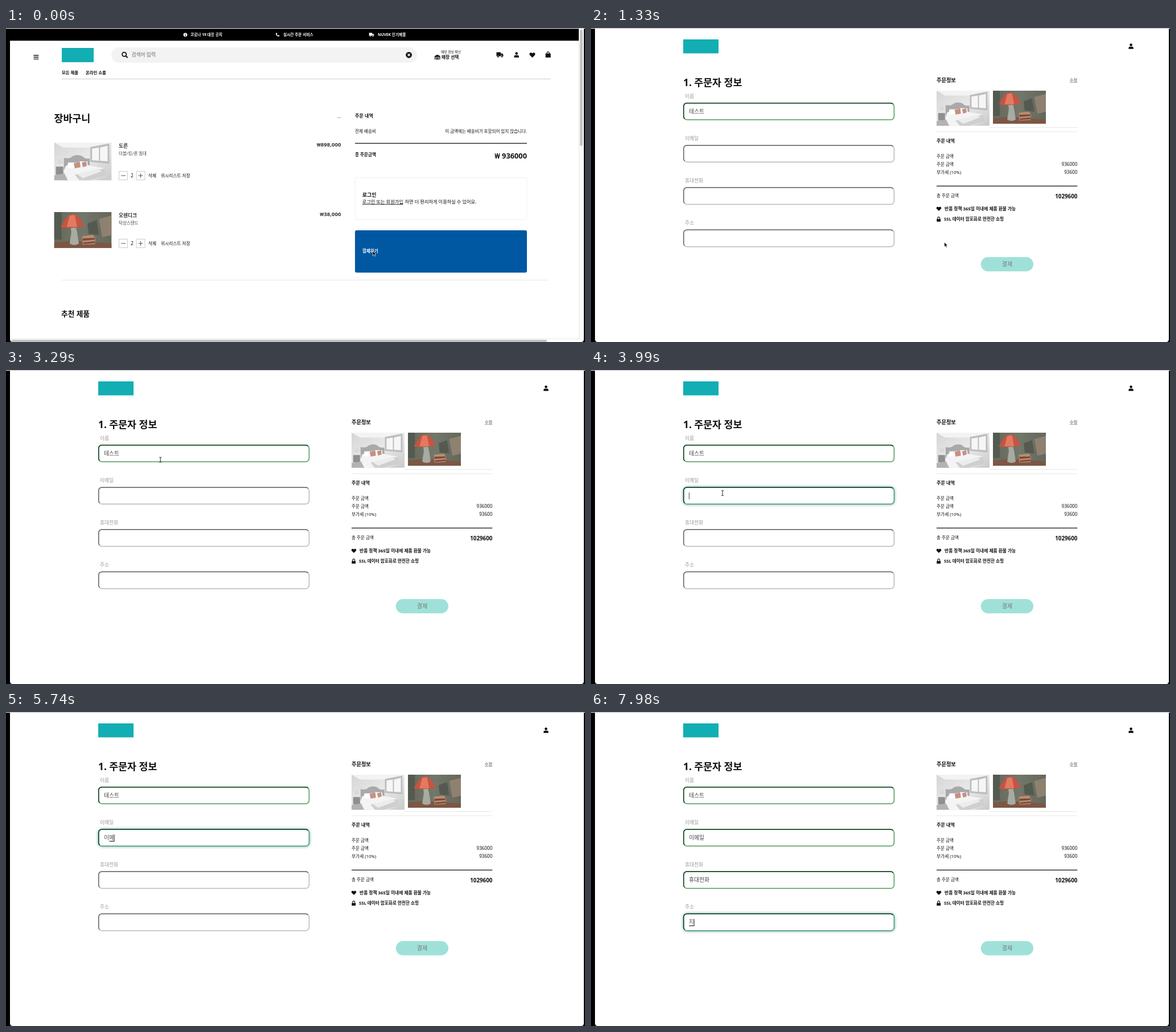
Animation of 1017x551 px, one loop 8000 ms. Source, as an HTML page:

```html
<!DOCTYPE html>
<html lang="ko">
<head>
<meta charset="utf-8">
<style>
html, body { margin: 0; width: 100%; height: 100%; overflow: hidden; background: #000 }
svg { display: block; font-family: "Noto Sans", "Noto Sans CJK KR", "Noto Sans CJK", sans-serif }
text { white-space: pre }
.b { font-weight: 700 }
.l { font-weight: 300 }
.e { text-anchor: end }
.m { text-anchor: middle }
.u { text-decoration: underline }
.glow { filter: drop-shadow(0 0 2.5px #5a9fbd) }
</style>
</head>
<body>
<svg id="stage" width="1017" height="551" viewBox="0 0 1017 551">
<defs>
<linearGradient id="wall" x2="1" y2="1"><stop stop-color="#d5d5d5"/><stop offset=".5" stop-color="#e9e9e9"/><stop offset="1" stop-color="#c9c9c9"/></linearGradient>
<linearGradient id="room" x2="1"><stop stop-color="#66685a"/><stop offset=".5" stop-color="#72776a"/><stop offset="1" stop-color="#65675b"/></linearGradient>
<symbol id="bed" viewBox="0 0 100 66" preserveAspectRatio="none">
<path fill="url(#wall)" d="M0 0H100V66H0Z"/>
<path fill="#f3f3f3" d="M0 0H100L62 9H16Z"/>
<path fill="#bdbdbd" d="M63 8L96 2V37L63 34Z"/>
<path fill="#f6f6f6" d="M66 11L78 9V32L66 31ZM80 9L93 6V33L80 32Z"/>
<path fill="#a9a9ab" d="M17 48V27Q28 29 32 24Q41 20 49 24Q53 29 62 28V47Z"/>
<path fill="#8f8f8f" d="M3 42H16V56H3Z"/>
<path fill="#d9d9d9" d="M7 29H13L15 37H5Z"/>
<path fill="#f4f4f4" d="M20 41Q40 29 61 40L88 45L92 58L66 66H22L17 50Z"/>
<path fill="#fff" d="M24 35H36V44H24ZM44 33H58V42H44Z"/>
<path fill="#c79181" d="M34 36L45 34L46 43L36 45ZM48 35L56 33L57 41L50 43Z"/>
<path fill="#cfcfcf" d="M36 56L88 45L92 58L62 66H44Z"/>
<path fill="#ececec" d="M40 55L76 46L83 50L50 62Z"/>
<path fill="#b3b3b3" d="M0 57L18 54L24 66H0Z"/>
</symbol>
<symbol id="lamp" viewBox="0 0 100 63" preserveAspectRatio="none">
<path fill="url(#room)" d="M0 0H100V63H0Z"/>
<path fill="#8f8170" d="M78 12L100 6V40L84 44Z"/>
<path fill="#545a50" d="M0 0H13V48H0ZM58 20L74 14L78 40L60 38Z"/>
<path fill="#7d5644" d="M0 54L30 50L100 55V63H0Z"/>
<path fill="#a7aba1" d="M29 27H38L40 35L43 55Q35 60 27 55L30 35Z"/>
<path fill="#c95340" d="M24 6Q32 2 41 6L53 24Q32 30 11 26Z"/>
<path fill="#e27a62" d="M27 6L36 5L40 26L22 26Z"/>
<path fill="#b78f73" d="M49 42L68 40L72 46L71 56L50 57Z"/>
<path fill="#814838" d="M50 46L71 45V48L50 50ZM51 53L71 51V54L51 56Z"/>
</symbol>
</defs>
<g id="cart"></g>
<g id="form"></g>
<g id="cursor"></g>
</svg>
<script>
const LOOP = 8000, STEP = 70, SWITCH = 280;
const $ = id => document.getElementById(id);

const icons = {
  user: 'M-2.5-2.6a2.5 2.5 0 1 1 5 0a2.5 2.5 0 1 1-5 0M-4.5 5V3.3Q-4.5 .8-2 .8H2Q4.5 .8 4.5 3.3V5Z',
  heart: 'M0 4.5L-4.5 0C-6.5-3-2.5-6 0-3C2.5-6 6.5-3 4.5 0Z',
  lock: 'M-3.8-.5H3.8V4.6H-3.8ZM-2.7-.5V-2.5a2.7 2.7 0 0 1 5.4 0V-.5H1.4V-2.5a1.4 1.4 0 0 0-2.8 0V-.5Z',
  truck: 'M-6-4.5H1.5V2.5H-6ZM2-2.5H4L6 0V2.5H2ZM-4.6 3a1.6 1.6 0 1 0 3.2 0a1.6 1.6 0 1 0-3.2 0M2 3a1.6 1.6 0 1 0 3.2 0a1.6 1.6 0 1 0-3.2 0',
  bag: 'M-4.5-2H4.5V5H-4.5ZM-2.6-2V-3a2.6 2.6 0 0 1 5.2 0V-2H1.4V-3a1.4 1.4 0 0 0-2.8 0V-2Z',
  store: 'M-4.8 4.2V-1.8L0-4.2L4.8-1.8V4.2H3.5V-.3H-3.5V4.2ZM-2.7 .6H2.7V1.8H-2.7ZM-2.7 2.6H2.7V4.2H-2.7Z',
  phone: 'M-3.6-3.4L-1.5-4L-.5-1.5L-1.6-.7Q-.8 .8 .7 1.6L1.5 .5L4 1.5L3.4 3.6Q-3.6 3.6-3.6-3.4Z'
};

// y is the vertical centre of the text
const text = (x, y, size, str, cls = '', fill = '#111') =>
  `<text x="${x}" y="${y + size * .37}" font-size="${size}" class="${cls}" fill="${fill}">${str}</text>`;
const rect = (x, y, w, h, fill, r = 0, more = '') =>
  `<rect x="${x}" y="${y}" width="${w}" height="${h}" rx="${r}" fill="${fill}" ${more}/>`;
const path = (d, stroke, width = 1, more = 'fill="none"') =>
  `<path d="${d}" stroke="${stroke}" stroke-width="${width}" ${more}/>`;
const icon = (name, x, y, fill = '#111', scale = 1) =>
  `<path d="${icons[name]}" fill="${fill}" transform="translate(${x} ${y}) scale(${scale})"/>`;
const photo = (id, x, y, w, h) => `<use href="#${id}" x="${x}" y="${y}" width="${w}" height="${h}"/>`;
const logo = (x, y, w, h) => rect(x, y, w, h, '#12aeb4');
const page = '<path fill="#fff" d="M7 0H1015V546Q1015 551 1010 551H12Q7 551 7 546Z"/>' + rect(0, 0, 1017, 1.3, '#c9c9c9');

const cartItem = (y, id, h, name, kind, price, row) =>
  photo(id, 84.5, y, 101, h) +
  text(198, y + 6, 8.7, name, 'b', '#333') +
  text(198, y + 19.3, 7.5, kind, '', '#444') +
  text(588.5, y + 3.8, 9.6, price, 'b e', '#333') +
  [198.5, 229].map(x => rect(x, row - 7.5, 15, 15, '#fff', 0, 'stroke="#ccc"')).join('') +
  path(`M202 ${row}h8M232.5 ${row}h8m-4-4v8`, '#555') +
  text(221.5, row, 8.4, '2', 'm') + text(250, row, 7.7, '삭제') + text(272, row, 7.7, '위시리스트 저장');

$('cart').innerHTML = page +
  rect(7, 1.3, 999, 21, '#000') +
  rect(1006, 1, 9, 545, '#fafafa') + path('M1006.5 1V546M7 545.5H1006', '#e8e8e8') +
  rect(1008.2, 3, 4.6, 204, '#c1c1c1', 2.3) + rect(9, 547, 941, 4, '#c1c1c1', 2) +
  '<circle cx="315" cy="11.8" r="3.4" fill="#fff"/>' + path('M315 11.3V14M315 9.4V10.4', '#000', 1.1) +
  icon('phone', 477, 11.8, '#fff', .85) + icon('truck', 642, 11.8, '#fff', .72) +
  text(324, 11.8, 6.7, '코로나 19 대응 공지', 'b', '#fff') +
  text(487, 11.8, 6.7, '실시간 주문 서비스', 'b', '#fff') +
  text(653, 11.8, 6.7, 'NUVEK 인기제품', 'b', '#fff') +
  path('M48.5 48H57.3M48.5 51.2H57.3M48.5 54.4H57.3', '#111', 1.4) +
  logo(98, 35, 56, 25) +
  rect(185, 34, 537, 27, '#f3f3f3', 13.5) +
  '<circle cx="207.7" cy="46.3" r="3.6" fill="none" stroke="#111" stroke-width="1.8"/>' +
  path('M210.2 48.8L213.6 52.2', '#111', 2) +
  text(220.5, 47, 8.7, '검색어 입력', '', '#666') +
  '<circle cx="707.6" cy="47.3" r="5.4" fill="#111"/>' + path('M705.6 45.3l4 4m0-4l-4 4', '#fff', 1.5) +
  text(764, 42.3, 5.8, '매장 정보 확인') + icon('store', 757.7, 51) + text(765, 51.3, 7.7, '매장 선택', 'b') +
  icon('truck', 867.5, 47) + icon('user', 896.7, 47, '#111', .95) + icon('heart', 924.5, 47.5) + icon('bag', 952.2, 46.8) +
  text(98, 78.5, 7.4, '모든 제품', 'b') + text(140, 78.5, 7.4, '온라인 쇼룸', 'b') +
  path('M98 89.4H956.5', '#ccc') +
  text(84.5, 158.5, 17.3, '장바구니', 'b') + text(588.5, 155, 8.5, '...', 'e', '#333') +
  cartItem(200.7, 'bed', 66.8, '도른', '더블/킹/퀸 침대', '₩898,000', 259) +
  cartItem(323, 'lamp', 63.3, '오렌디크', '탁상스탠드', '₩38,000', 378) +
  text(613, 154.5, 8.1, '주문 내역', 'b') + text(613, 181.3, 7.6, '전체 배송비') +
  text(915, 181.3, 7.56, '이 금액에는 배송비가 포함되어 있지 않습니다.', 'e') +
  path('M613 202.4H915', '#111', 1.4) +
  text(613, 222.3, 7.6, '총 주문금액', 'b') + text(915, 223.8, 12.8, '₩ 936000', 'b e') +
  rect(613, 262.5, 302, 74, '#fff', 3, 'stroke="#f0f0f0"') +
  text(625.7, 292.8, 9, '로그인', 'b') + text(625.7, 305, 8.2, '로그인 또는 회원가입', 'u') +
  text(700.5, 305, 8.2, '하면 더 편리하게 이용하실 수 있어요.') +
  rect(613, 355, 302, 74.3, '#0058a3', 3) + text(625.7, 391.3, 7.6, '결제하기', 'b', '#fff') +
  path('M98 442.3H952', '#e6e6e6') + text(97, 501, 12.7, '추천 제품', 'b');

const labels = ['이름', '이메일', '휴대전화', '주소'];
const fieldY = i => 131.7 + i * 74.2;

const formBase = page + logo(162, 20, 62, 24.5) + icon('user', 948.5, 32, '#111', .95) +
  text(162, 95.3, 17.3, '1. 주문자 정보', 'b') +
  labels.map((s, i) => text(165, fieldY(i) - 12.3, 8.7, s, 'l', '#999')).join('') +
  text(607, 92, 9.2, '주문정보', 'b') + text(854.3, 91.3, 7.4, '수정', 'e u b', '#888') +
  photo('bed', 607, 110, 93, 61.7) + photo('lamp', 706, 110, 93, 58) +
  path('M700 174.5H854M607 182H854', '#e6e6e6') +
  text(607, 198, 8.1, '주문 내역', 'b') +
  text(607, 225, 7.6, '주문 금액') +
  text(607, 239.3, 7.6, '주문 금액') + text(854.3, 239.3, 8.1, '936000', 'e') +
  text(607, 253.3, 7.7, '부가세 (10%)') + text(854.3, 253.3, 8.1, '93600', 'e') +
  path('M607 277.4H854.3', '#111', 1.4) +
  text(607, 294.3, 7.6, '총 주문 금액') + text(854.3, 295, 9.75, '1029600', 'b e') +
  icon('heart', 611, 317.3, '#111', .85) + text(621, 317.3, 7.75, '반품 정책 365일 이내에 제품 환불 가능', 'b') +
  icon('lock', 610.7, 335.7, '#111', .9) + text(620, 335.3, 7.65, 'SSL 데이터 암호화로 안전한 쇼핑', 'b') +
  rect(684.7, 402, 92.3, 25, '#9fe1d8', 12.5) + text(731, 414.3, 10, '결제', 'm', '#777');

const status = '<path fill="#565656" d="M7 542H340Q343 542 343 545V551H7Z"/>' +
  text(10, 547.8, 6.7, '10.58.7.174의 응답을 기다리는 중...', '', '#eee');

function field(i, value, focused) {
  const y = fieldY(i), [dark, light] = value || focused ? ['#123c22', '#4b9a55'] : ['#686868', '#b9b9b9'];
  return rect(162.7, y, 369.7, 29.4, '#fff', 6, `stroke="${light}" stroke-width="1.5" class="${focused ? 'glow' : ''}"`) +
    path(`M164.5 ${y + 27.6}Q162.7 ${y + 26} 162.7 ${y + 23.4}V${y + 6}Q162.7 ${y} 168.7 ${y}H526.4Q529 ${y} 530.7 ${y + 1.8}`, dark, 1.5) +
    text(172, y + 14.5, 9.8, value, 'l', '#444');
}

// focus time, first key time, key interval, composition stages
const entries = [
  [3920, 5040, 140, 'ㅇ 이 임 이메 이메 이메 이멩 이메이 이메일'],
  [6370, 6650, 112, 'ㅎ 휴 휻 휴대 휴댖 휴대저 휴대전 휴대젆 휴대전화'],
  [7770, 7840, 100, 'ㅈ 지']
];

function drawForm(t) {
  const values = ['테스트', '', '', ''];
  let focus = 0, composing = false;
  entries.forEach(([start, first, gap, keys], i) => {
    if (t < start) return;
    const list = keys.split(' '), k = Math.floor((t - first) / gap);
    focus = i + 1;
    composing = k >= 0;
    values[focus] = composing ? list[Math.min(k, list.length - 1)] : '';
  });
  let out = formBase + values.map((v, i) => field(i, v, focus && i === focus)).join('');
  if (focus) {
    const y = fieldY(focus), x = 172.4 + 9 * values[focus].length, since = t - entries[focus - 1][0];
    if (composing) out += path(`M${x - 9} ${y + 20.8}H${x}`, '#222', 1.2);
    if (composing || since % 1000 < 500) out += path(`M${x} ${y + 9}V${y + 21}`, '#333', .9);
  }
  return out + (t < 980 ? status : '');
}

// time, x, y
const route = [[0, 644, 391.5], [1190, 644, 391.5], [2100, 277, 149], [3150, 277, 149], [3780, 231, 216], [LOOP, 231, 216]];

function drawCursor(t) {
  if (t >= entries[0][1]) return '';
  const n = route.findIndex(p => p[0] > t), [t0, x0, y0] = route[n - 1], [t1, x1, y1] = route[n];
  const p = (t - t0) / (t1 - t0), ease = p * p * (3 - 2 * p);
  const x = x0 + (x1 - x0) * ease, y = y0 + (y1 - y0) * ease;
  const overField = t >= SWITCH && x > 162 && x < 533 && labels.some((_, i) => y > fieldY(i) && y < fieldY(i) + 30);
  return overField
    ? path(`M${x - 2} ${y - 4.5}q2 0 2 1.2q0-1.2 2-1.2M${x} ${y - 3.5}v7M${x - 2} ${y + 4.5}q2 0 2-1.2q0 1.2 2 1.2`, '#222')
    : path(`M${x} ${y}v8l1.9-1.8l1.4 3l1.5-.7l-1.4-2.9h2.5z`, '#fff', .7, 'fill="#000"');
}

function frame(now) {
  const t = Math.floor(now % LOOP / STEP) * STEP, paid = t >= SWITCH;
  $('cart').style.display = paid ? 'none' : '';
  $('form').innerHTML = paid ? drawForm(t) : '';
  $('cursor').innerHTML = drawCursor(t);
  requestAnimationFrame(frame);
}
requestAnimationFrame(frame);
</script>
</body>
</html>
```
